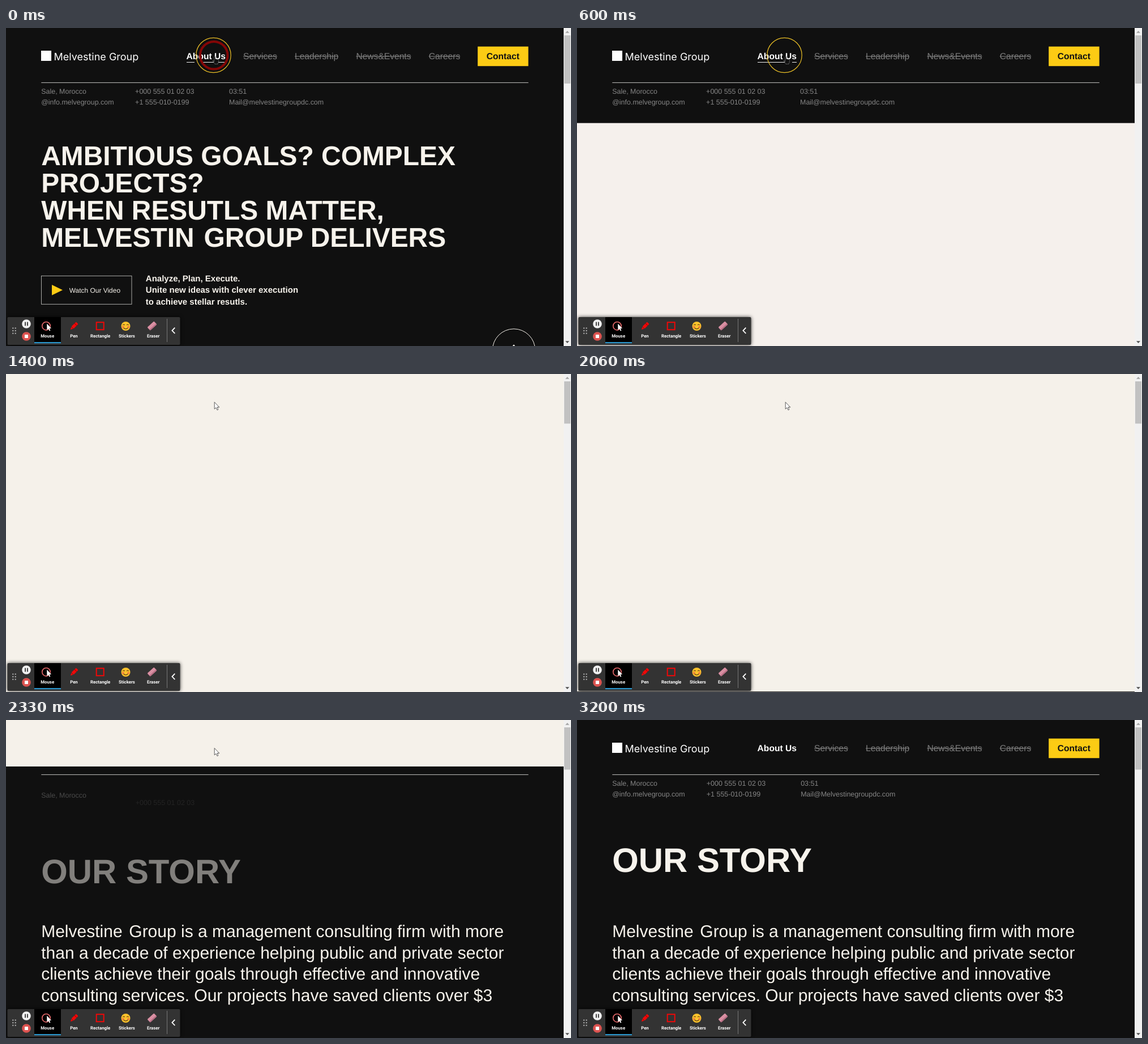
An HTML page for the animation above (3.26 s loop, 998 by 561 pixels).

```html
<!DOCTYPE html>
<html lang="en">
<head>
<meta charset="utf-8">
<title>Melvestine Group</title>
<style>
html, body { margin: 0; width: 100%; height: 100%; overflow: hidden; background: #101010; }
svg { display: block; width: 100vw; height: 100vh; }
text { font-family: "Liberation Sans", Arial, sans-serif; text-rendering: geometricPrecision; white-space: pre; }
.b { font-weight: 700; }
.logo { font-family: Inter, sans-serif; }
.tool { font-family: Roboto, sans-serif; font-weight: 700; text-anchor: middle; }
</style>
</head>
<body>
<svg viewBox="0 0 998 561" preserveAspectRatio="none">
  <rect width="998" height="561" fill="#101010"/>
  <g id="home"></g>
  <g id="about"></g>
  <g id="header"></g>
  <g id="halo" fill="none">
    <circle id="pulse" cx="367.2" cy="48.2" r="24.3" stroke="#840606" stroke-width="4"/>
    <circle cx="366.5" cy="48" r="30.7" stroke="#e9be26" stroke-width="1.2"/>
  </g>
  <rect id="panel" width="985" height="561"/>
  <g id="hand" stroke="#c9c9c9" stroke-width=".7" stroke-dasharray="1.2 1" fill="#111">
    <path d="M367.6 59V50.6q1.1-1.5 2.2 0V55q1.2-.9 2 .2 1.2-.7 1.9.4 1.5-.3 1.6 1.1v3.4l-1.3 3.5h-5l-3.4-5q-.6-1.3.6-1.2z"/>
  </g>
  <path id="arrow" d="M368.2 49.6V61.8L371 59.3 373 63.6 374.9 62.7 373 58.6H376.8Z" fill="#fff" stroke="#333" stroke-width=".8"/>
  <g id="bar">
    <rect x="985" width="13" height="561" fill="#f1f1f1"/>
    <rect id="thumb" x="986" y="13" width="11" fill="#c1c1c1"/>
    <path d="M988 8.7 991.5 5 995 8.7Z" fill="#a3a3a3"/>
    <path d="M988 552.3 991.5 556 995 552.3Z" fill="#505050"/>
  </g>
  <g id="tools"></g>
</svg>
<script>
const $ = id => document.getElementById(id);
const LIGHT = '#f7f3ec', GREY = '#858585', YELLOW = '#fccb14';

const text = (x, y, size, str, fill, cls = '') =>
  `<text x="${x}" y="${y}" font-size="${size}" fill="${fill}" class="${cls}">${str}</text>`;
const rect = (x, y, w, h, fill, more = '') =>
  `<rect x="${x}" y="${y}" width="${w}" height="${h}" fill="${fill}" ${more}/>`;
const lines = (x, y, pitch, size, list, cls) =>
  list.map((s, i) => text(x, y + i * pitch, size, s, LIGHT, cls)).join('');

// Contact details: three columns, two rows
const contacts = (cols, mail) => [
  ['Sale, Morocco', '+000 555 01 02 03', '03:51'],
  ['@info.melvegroup.com', '+1 555-010-0199', mail]
].flatMap((row, r) => row.map((s, c) =>
  `<g class="item">${text(cols[c], 116.4 + r * 18.8, 12.48, s, GREY)}</g>`)).join('');

const nav = [[419, 60, 'Services'], [510, 77, 'Leadership'], [618.4, 97, 'News&amp;Events'], [746.8, 55.4, 'Careers']];
$('header').innerHTML =
  rect(62, 40, 18, 18, '#fff') +
  text(84.5, 57.3, 18, 'Melvestine Group', '#fff', 'logo') +
  text(318.6, 55, 15.6, 'About Us', '#fff', 'b') +
  nav.map(([x, w, s]) => text(x, 55.1, 15.6, s, '#7c7c7c') + rect(x, 49.5, w, 1.1, '#7c7c7c')).join('') +
  rect(833.2, 32.7, 89.4, 34.5, YELLOW) +
  text(848.8, 55.1, 15.6, 'Contact', '#111', 'b') +
  rect(62.3, 95.9, 860.4, 1, '#c4c3c0');

$('home').innerHTML =
  contacts([62.2, 228.1, 394], 'Mail@melvestinegroupdc.com') +
  rect(0, 60, 0, 1, '#eee', 'id="lineA"') + rect(0, 60, 0, 1, '#eee', 'id="lineB"') +
  lines(62.2, 242.4, 47.8, 47.9, ['AMBITIOUS GOALS? COMPLEX', 'PROJECTS?', 'WHEN RESUTLS MATTER,', 'MELVESTIN'], 'b') +
  text(349.6, 385.8, 47.9, 'GROUP DELIVERS', LIGHT, 'b') +
  rect(62.5, 437.3, 159.5, 50, 'none', 'stroke="#bdbcb9" stroke-width=".9"') +
  `<path d="M81 453 100 462.3 81 471.5Z" fill="${YELLOW}"/>` +
  text(111.8, 466.5, 11.95, 'Watch Our Video', LIGHT) +
  lines(246.8, 446.5, 20.5, 15, ['Analyze, Plan, Execute.', 'Unite new ideas with clever execution', 'to achieve stellar resutls.'], 'b') +
  `<circle cx="897" cy="568.5" r="37.7" fill="none" stroke="${LIGHT}"/>` +
  `<path d="M894 563 897 559.5 900 563" fill="none" stroke="${LIGHT}" stroke-width="1.5"/>`;

$('about').innerHTML =
  `<g id="story">${text(62.2, 268, 59.9, 'OUR STORY', LIGHT, 'b')}</g>` +
  contacts([62.2, 228.8, 395.2], 'Mail@Melvestinegroupdc.com') +
  text(217.3, 383.4, 30, 'Group is a management consulting firm with more', LIGHT) +
  lines(62.2, 383.4, 37.5, 30, [
    'Melvestine',
    'than a decade of experience helping public and private sector',
    'clients achieve their goals through effective and innovative',
    'consulting services. Our projects have saved clients over $3']);

const labels = ['Mouse', 'Pen', 'Rectangle', 'Stickers', 'Eraser'];
$('tools').innerHTML =
  rect(2.5, 510, 305, 49, '#333', 'rx="2" style="filter:drop-shadow(0 0 3px rgba(0,0,0,.75))"') +
  [0, 1, 2, 3, 4, 5].map(i => rect(11.3 + i % 2 * 4.4, 528.5 + (i >> 1) * 4.6, 2, 2, '#bbb')).join('') +
  '<circle cx="36" cy="522" r="7.8" fill="#f1f1f1"/>' +
  rect(33.2, 518.7, 1.8, 6.6, '#333') + rect(37, 518.7, 1.8, 6.6, '#333') +
  '<circle cx="36" cy="544" r="7.8" fill="#dc5350"/>' + rect(33, 541, 6, 6, '#fff') +
  rect(50, 510, 47, 46, '#000') + rect(50, 554, 47, 2.2, '#2a95cc') +
  '<circle cx="71" cy="525.7" r="7.2" fill="none" stroke="#e8696b" stroke-width="1.6"/>' +
  '<path d="M72.3 521.5V533L75 530.6 76.7 534.4 78.4 533.6 76.7 530H80Z" fill="#fff"/>' +
  '<g transform="translate(120 526) rotate(45)">' +
    rect(-2.7, -8, 5.4, 11.5, '#f00808', 'rx="1"') + rect(-2.7, -4.6, 5.4, .9, '#900') +
    '<path d="M-2.3 4.2H2.3L0 8.6Z" fill="#f00808"/></g>' +
  rect(159.7, 519.2, 13, 13, 'none', 'stroke="#f00808" stroke-width="2"') +
  '<circle cx="211.5" cy="526" r="8" fill="#fcc32c"/>' +
  '<circle cx="206.8" cy="527.4" r="2" fill="#f3803c"/><circle cx="216.2" cy="527.4" r="2" fill="#f3803c"/>' +
  '<path d="M206.3 524.3q1.8-2.5 3.6 0M213.1 524.3q1.8-2.5 3.6 0M207.6 529q3.9 3.6 7.8 0" fill="none" stroke="#5d3a12" stroke-width="1.1"/>' +
  '<g transform="translate(258 525.5) rotate(-42)">' + rect(-8, -3.8, 16, 7.6, '#d98fa2', 'rx="1.5"') +
    rect(-8, 1.6, 16, 2.2, '#b86f85', 'rx="1"') + '</g>' +
  labels.map((s, i) => text(73.2 + i * 46.75, 546, 7.8, s, '#fff', 'tool')).join('') +
  rect(284, 513, 1, 41, '#777') +
  '<path d="M298.3 528.7 293.4 533.8 298.3 538.9" fill="none" stroke="#fff" stroke-width="1.8"/>';

const LOOP = 3260, STEP = 1000 / 15;
const WIPE = 448, COVER = 340.7, REVEAL = 2034;
const RISE = 500, STAGGER = 100, ENTER = 2191;
const clamp = u => Math.min(1, Math.max(0, u));
const inOut = u => u < .5 ? 4 * u ** 3 : 1 - 4 * (1 - u) ** 3;
const out = u => 1 - (1 - u) ** 2;
const show = (id, on) => $(id).style.display = on ? '' : 'none';
const items = [...document.querySelectorAll('#about .item')];

function span(id, from, to) {
  $(id).setAttribute('x', from);
  $(id).setAttribute('width', Math.max(0, to - from));
}

function rise(el, t, start) {
  const e = out(clamp((t - start) / RISE));
  el.setAttribute('transform', `translate(0 ${40 * (1 - e)})`);
  el.setAttribute('opacity', e);
}

function draw(ms) {
  const t = Math.floor((ms % LOOP + 7) / STEP) * STEP;
  const loaded = t > 1190;
  const top = 561 * (1 - inOut(clamp((t - COVER) / WIPE)));
  const bottom = 561 * (1 - inOut(clamp((t - REVEAL) / WIPE)));

  show('home', !loaded);
  show('about', loaded);
  show('halo', !loaded);
  show('arrow', loaded && t < 2500);
  show('hand', !loaded || t >= 2500 && t < 3190);
  $('panel').setAttribute('y', top);
  $('panel').setAttribute('height', Math.max(0, bottom - top));
  $('panel').setAttribute('fill', loaded ? '#f5f1ea' : '#f5f0ec');
  $('thumb').setAttribute('height', loaded ? 74.5 : 85);
  $('pulse').setAttribute('opacity', clamp(1 - t / 333));

  // the old underline leaves to the right while a new one grows from the left
  const u = clamp(t / 467);
  span('lineA', 319, 333 + 42 * u);
  if (t > 500) span('lineB', 380, 388);
  else span('lineB', 347 + 41 * u, 388);

  rise($('story'), t, ENTER);
  items.forEach((el, i) => rise(el, t, ENTER + i * STAGGER));
}

const begin = performance.now();
function frame() {
  draw(performance.now() - begin);
  requestAnimationFrame(frame);
}
draw(0);
requestAnimationFrame(frame);
</script>
</body>
</html>
```
